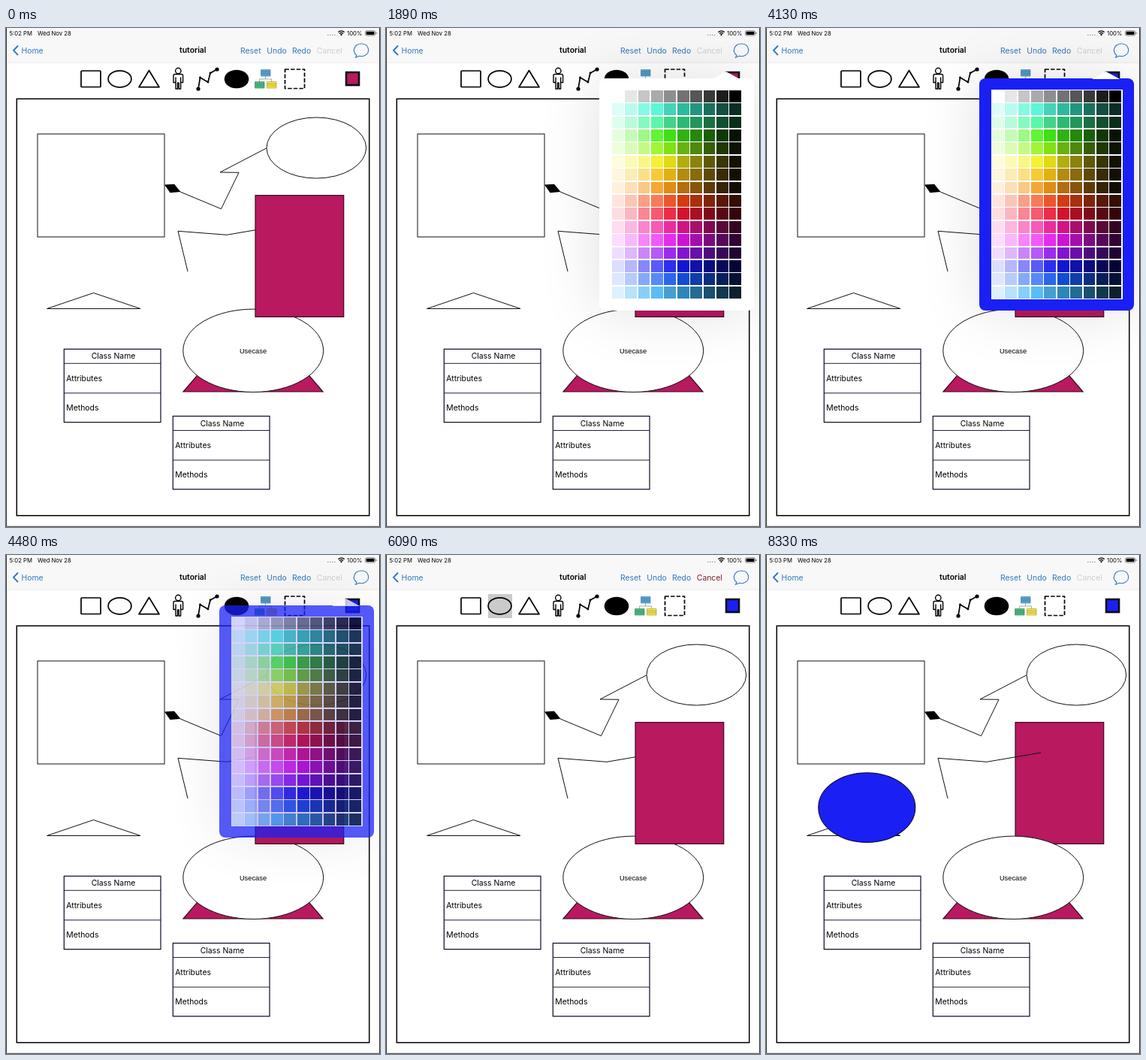
Write an HTML page that moves like this. It is 498x664 px and loops after 8400 ms.

```html
<!DOCTYPE html>
<html lang="en">
<head>
<meta charset="utf-8">
<title>Diagram editor tutorial</title>
<style>
  html, body { margin: 0; width: 100%; height: 100%; overflow: hidden; background: #fff; }
  #stage { position: relative; width: 498px; height: 664px; overflow: hidden; }
  svg { position: absolute; left: 0; top: 0; }
  text { font-family: Inter, Roboto, sans-serif; font-size: 10.4px; fill: #000; }
  .status { font-size: 7.7px; }
  .nav { fill: #3478c0; }
  .title { font-weight: 600; text-anchor: middle; }
  .mid { text-anchor: middle; }
  .usecase { font: 9.3px "Liberation Sans", Arial, sans-serif; text-anchor: middle; }
  .line { fill: none; stroke: #111; stroke-width: 1; }
  .solid { fill: #fff; stroke: #111; stroke-width: 1; }
  .class { fill: #fff; stroke: #0a0a28; stroke-width: 1.2; }
  .pink { fill: #b8195f; stroke: #3a0a20; stroke-width: 1.2; }
  .icon { fill: none; stroke: #000; stroke-width: 1.7; stroke-linejoin: round; }
  #pop { position: absolute; inset: 0; }
  #pop div { position: absolute; }
  #arrow { left: 434px; top: 58px; width: 37px; height: 10px; background: #fff;
    clip-path: polygon(51% 0, 100% 100%, 0 100%); }
  #panel { left: 284px; top: 67px; width: 206px; height: 309px; border-radius: 8px;
    box-shadow: 0 0 80px rgba(0, 0, 0, .13); }
  #grid { left: 300px; top: 82px; width: 174.5px; height: 279px; background: #fff; }
</style>
</head>
<body>
<div id="stage">
  <svg width="498" height="664" viewBox="0 0 498 664">
    <rect width="498" height="664" fill="#fff"/>
    <rect width="498" height="46" fill="#f8f8f8"/>
    <path d="M0 46.2H498" stroke="#ddd" stroke-width=".6"/>
    <path d="M.5 0V663.3H497.5V0" fill="none" stroke="#333"/>

    <!-- status bar -->
    <text id="clock" class="status" x="4.5" y="9.8">5:02 PM</text>
    <text class="status" x="42" y="9.8">Wed Nov 28</text>
    <path d="M428 9.3h11" stroke="#999" stroke-width="1.3" stroke-dasharray="1.4 1.6"/>
    <g fill="none" stroke="#000" stroke-width="1.3">
      <path d="M442.3 5.6q4.2-3.6 8.4 0M443.9 7.4q2.6-2.2 5.2 0"/>
      <circle cx="446.5" cy="9" r=".5"/>
    </g>
    <text class="status" x="454" y="9.8">100%</text>
    <rect x="478.5" y="3.7" width="13" height="6.4" rx="1.6" fill="none" stroke="#555" stroke-width=".7"/>
    <rect x="479.6" y="4.8" width="10.8" height="4.2" rx=".8"/>
    <path d="M493 5.8v2.2" stroke="#555"/>

    <!-- navigation bar -->
    <path d="M16 23.5 10 29.8 16 36" fill="none" stroke="#3478c0" stroke-width="1.9"/>
    <text class="nav" x="20.5" y="33.6">Home</text>
    <text class="title" x="248.8" y="33.4">tutorial</text>
    <text class="nav" x="312" y="33.6">Reset</text>
    <text class="nav" x="347.3" y="33.6">Undo</text>
    <text class="nav" x="381" y="33.6">Redo</text>
    <text id="cancel" x="413.8" y="33.6">Cancel</text>
    <path d="M467 36.2C460.500 32 463 21 473.300 21S485.500 32.500 478 36.500Q474 38.500 470.500 37.300L465.500 39.300Z"
      fill="none" stroke="#3478c0" stroke-width="1.1"/>

    <!-- tool bar -->
    <rect id="picked" x="136" y="52" width="32" height="32" fill="#cacaca"/>
    <rect class="icon" x="100" y="57" width="26" height="21.500" rx="1"/>
    <ellipse class="icon" cx="151.500" cy="67.800" rx="15.400" ry="11"/>
    <path class="icon" d="M190.500 56.500 204 78.700H177Z"/>
    <g class="icon" style="stroke-width:1.400">
      <circle cx="229.300" cy="57" r="3.700"/>
      <path d="M225 61.500h8.600q2 0 2 2v9h-3v8.500h-2.500V73h-1.600v8h-2.500v-8.500h-3v-9q0-2 2-2ZM226 65.500v7M232.600 65.500v7"/>
    </g>
    <path class="icon" d="M256 81 258.500 66 269 72 272 60 281 55"/>
    <g id="knots"></g>
    <ellipse cx="307" cy="68" rx="16.300" ry="12.200"/>
    <g stroke-width=".6">
      <path d="M345.500 64v4M337.500 71.500v-3.500h16v3.500" fill="none" stroke="#777"/>
      <path d="M339.500 55.500h12.500v8.500h-12.500Z" fill="#5aa5d2" stroke="#3878a0"/>
      <path d="M331.500 71.500h12.500v8.500h-12.500Z" fill="#4fb985" stroke="#2d8058"/>
      <path d="M347.500 71.500h12.500v8.500h-12.500Z" fill="#f3e34a" stroke="#a59420"/>
      <path d="M339.500 58.300h12.500M339.500 61h12.500M331.500 74.300h12.500M331.500 77h12.500M347.500 74.300h12.500M347.500 77h12.500"
        stroke="#0006"/>
    </g>
    <rect class="icon" x="371.500" y="55" width="26" height="25.500" stroke-dasharray="5.400 2.200"/>
    <rect id="swatch" x="453" y="59" width="17" height="17" stroke="#0a0a14" stroke-width="2.600"/>

    <!-- drawing -->
    <rect x="14.300" y="94.300" width="469.400" height="554.500" fill="none" stroke="#000" stroke-width="1.500"/>
    <rect class="line" x="42" y="141" width="169" height="137"/>
    <path d="M211 208.500 224 207.800 232.500 218 218.500 219.300Z"/>
    <path class="line" d="M232 218 286.500 240.700 310 192.300 285 192 347 159.800"/>
    <ellipse class="line" cx="413.300" cy="159.500" rx="66.300" ry="40.500"/>
    <path class="line" d="M54.500 373.500 116.500 352.500 179 373.500Z"/>
    <g id="layers">
      <g id="under">
        <path class="line" d="M242 324 229 270.300 294 275.300 366 263"/>
        <path class="pink" d="M329 375 422 484H236Z"/>
        <ellipse class="solid" cx="329.200" cy="429.300" rx="93.400" ry="55.200"/>
        <text class="usecase" x="329" y="432.700">Usecase</text>
      </g>
      <rect id="block" class="pink" x="332" y="222.700" width="117.700" height="161.700"/>
    </g>
    <g id="classes"></g>
    <ellipse id="oval" fill="#1a20f3" stroke="#10104a" stroke-width="1.200"/>
  </svg>
  <div id="pop">
    <div id="panel"></div>
    <div id="arrow"></div>
    <div id="grid"></div>
  </div>
</div>
<script>
const LOOP = 8400;
const PINK = '#b8195f', BLUE = '#1a20f3';
const $ = id => document.getElementById(id);

// Times of the user's actions, in ms
const at = {
  open: 1120, opened: 1330, pick: 3220, close: 4410, closed: 4690,
  tool: 5040, touch: 6230, drag: 6440, minute: 6860, release: 7350
};

$('knots').innerHTML = [[256, 81], [258.5, 66], [269, 72], [272, 60], [281, 55]]
  .map(([x, y], i) => `<circle cx="${x}" cy="${y}" r="${i % 4 ? 1.4 : 2.6}"/>`).join('');

const classBox = (x, y) => `
  <rect class="class" x="${x}" y="${y}" width="128.700" height="97.300"/>
  <path class="class" d="M${x} ${y + 19}h128.700M${x} ${y + 58.5}h128.700" style="stroke-width:.9"/>
  <text class="mid" x="${x + 65.7}" y="${y + 13}">Class Name</text>
  <text x="${x + 3}" y="${y + 42.5}">Attributes</text>
  <text x="${x + 3}" y="${y + 81.5}">Methods</text>`;
$('classes').innerHTML = classBox(77.3, 427.3) + classBox(222.3, 516.5);

// Palette: one grey row, then tints and shades of each hue
const hues = [168, 150, 108, 88, 58, 46, 35, 13, 352, 325, 298, 275, 239, 222, 202];
const lights = [93, 85, 75, 66, 55, 45, 36, 27, 19, 11];

function cellColor(row, col) {
  if (!row) {
    const grey = [255, 230, 198, 170, 142, 114, 86, 56, 28, 0][col];
    return `rgb(${grey},${grey},${grey})`;
  }
  const hue = hues[row - 1];
  const cool = row < 3 || row === 15;
  const sat = col < 4 ? 92 : cool ? 62 : 84;
  const light = lights[col] - (row > 2 && row < 8 && col > 2 ? 7 : 0);
  return `hsl(${hue} ${sat}% ${light}%)`;
}

const pitch = 17.4;
for (let i = 0; i < 160; i++) {
  const col = i % 10, row = Math.floor(i / 10);
  const cell = document.createElement('div');
  cell.style.cssText = `left:${col * pitch + .8}px;top:${row * pitch + .8}px;` +
    `width:${pitch - 1.5}px;height:${pitch - 1.5}px;background:${cellColor(row, col)}`;
  $('grid').append(cell);
}

const ramp = (t, a, b) => Math.min(1, Math.max(0, (t - a) / (b - a)));
const smooth = p => p * p * (3 - 2 * p);

function draw(t) {
  const color = t < at.pick ? PINK : BLUE;
  const alpha = ramp(t, at.open, at.opened) * (1 - ramp(t, at.close, at.closed));
  for (const part of ['panel', 'arrow', 'grid']) $(part).style.opacity = alpha;
  $('pop').style.display = alpha ? 'block' : 'none';
  $('panel').style.background = t < at.pick ? '#fff' : BLUE;
  $('swatch').setAttribute('fill', color);

  const drawing = t >= at.tool && t < at.release;
  $('picked').style.display = drawing ? '' : 'none';
  $('cancel').style.fill = drawing ? '#7d1f2d' : '#cfcfcf';
  $('clock').textContent = t < at.minute ? '5:02 PM' : '5:03 PM';

  // A new shape sends the block behind its neighbours
  const top = t < at.touch ? $('block') : $('under');
  if ($('layers').lastElementChild !== top) $('layers').append(top);

  const size = smooth(ramp(t, at.drag, at.release));
  const rx = 64.5 * size, ry = 46.3 * size;
  const oval = { cx: 69.8 + rx, cy: 289.8 + ry, rx, ry };
  for (const key in oval) $('oval').setAttribute(key, oval[key]);
  $('oval').style.display = size ? '' : 'none';
}

const start = performance.now();
function tick() {
  draw((performance.now() - start) % LOOP);
  requestAnimationFrame(tick);
}
tick();
</script>
</body>
</html>
```
